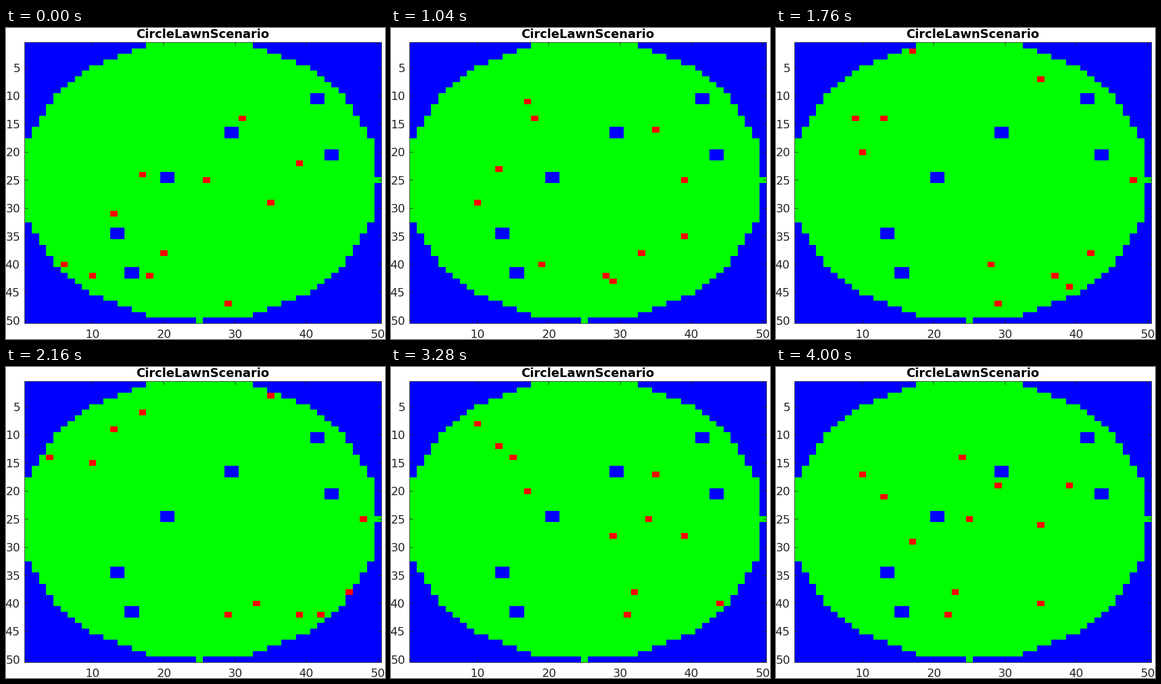
Recreate the animation shown at these times as a matplotlib script. Size 720 by 592 pixels, loop 4.08 s.

```python
import numpy as np
import matplotlib.pyplot as plt
from matplotlib.animation import FuncAnimation

W, H, DPI = 720, 592, 80
N, STEPS, STEP_MS = 50, 51, 80
X0, CELL_W = 35.8, 13.546
Y0, CELL_H = 27.87, 10.685
BLUE, GREEN, RED, INK = (0, 0, 255), (0, 255, 0), (255, 0, 0), (38, 38, 38)
TICK = 7

# upper left cell (column, row) of each 2x2 obstacle
OBSTACLES = [(41, 10), (29, 16), (43, 20), (20, 24), (13, 34), (15, 41)]

# starting cells of the mowers, by heading
EAST = [(26, 25), (20, 38), (6, 40)]
WEST = [(31, 14), (18, 42)]
NORTH = [(17, 24), (35, 29), (10, 42), (29, 47)]
SOUTH = [(39, 22), (13, 31)]
HEADINGS = [((1, 0), EAST), ((-1, 0), WEST), ((0, -1), NORTH), ((0, 1), SOUTH)]


def make_lawn():
    mid = N // 2
    row, col = np.mgrid[1:N + 1, 1:N + 1]
    lawn = (col - mid) ** 2 + (row - mid) ** 2 <= mid ** 2
    for c, r in OBSTACLES:
        lawn[r - 1:r + 1, c - 1:c + 1] = False
    return lawn


def simulate(lawn):
    """Each mower goes straight; when blocked it spends one step turning back."""
    cells = [c for _, group in HEADINGS for c in group]
    moves = [d for d, group in HEADINGS for _ in group]
    history = []
    for _ in range(STEPS):
        history.append(list(cells))
        for i, ((c, r), (dx, dy)) in enumerate(zip(cells, moves)):
            c, r = c + dx, r + dy
            inside = 1 <= c <= N and 1 <= r <= N
            if inside and lawn[r - 1, c - 1] and (c, r) not in cells:
                cells[i] = (c, r)
            else:
                moves[i] = (-dx, -dy)
    return history


def x_at(v):
    return X0 + CELL_W * (v - .5)


def y_at(v):
    return Y0 + CELL_H * (v - .5)


lawn = make_lawn()
history = simulate(lawn)
base = np.where(lawn[..., None], GREEN, BLUE).astype(np.uint8)

edges = np.arange(N + 1) + .5
xs = np.round(x_at(edges)).astype(int)
ys = np.round(y_at(edges)).astype(int)
left, right = int(x_at(.5)), int(x_at(N + .5))
top, bottom = int(y_at(.5)), int(y_at(N + .5))
x_ticks = range(10, N + 1, 10)
y_ticks = range(5, N + 1, 5)


def draw_axes(canvas):
    canvas[top:bottom + 1, [left, right]] = INK
    canvas[[top, bottom], left:right + 1] = INK
    for v in x_ticks:
        x = int(x_at(v))
        canvas[top:top + TICK, x] = INK
        canvas[bottom - TICK + 1:bottom, x] = INK
    for v in y_ticks:
        y = int(y_at(v))
        canvas[y, left:left + TICK] = INK
        canvas[y, right - TICK + 1:right] = INK


def picture(i):
    grid = base.copy()
    for c, r in history[i]:
        grid[r - 1, c - 1] = RED
    canvas = np.full((H, W, 3), 255, np.uint8)
    canvas[ys[0]:ys[-1], xs[0]:xs[-1]] = (
        grid.repeat(np.diff(ys), axis=0).repeat(np.diff(xs), axis=1))
    draw_axes(canvas)
    return canvas


fig = plt.figure(figsize=(W / DPI, H / DPI), dpi=DPI, facecolor="white")
ax = fig.add_axes([0, 0, 1, 1])
ax.axis("off")
img = ax.imshow(picture(0), interpolation="nearest", aspect="auto",
                extent=(0, W, H, 0))


def write(x, y, text, size, ha="center", **style):
    ax.text(x, y, text, fontsize=size * 72 / DPI, ha=ha, va="baseline",
            fontfamily="DejaVu Sans", **style)


for v in x_ticks:
    write(x_at(v), 590, str(v), 21.8, color="#262626")
for v in y_ticks:
    write(27, y_at(v) + 8, str(v), 21.8, ha="right", color="#262626")
write((left + right) / 2, 19, "CircleLawnScenario", 23, fontweight="bold")


def update(i):
    img.set_data(picture(i))
    return [img]


anim = FuncAnimation(fig, update, frames=STEPS, interval=STEP_MS,
                     repeat=True, repeat_delay=0, blit=False)
plt.show()
```
